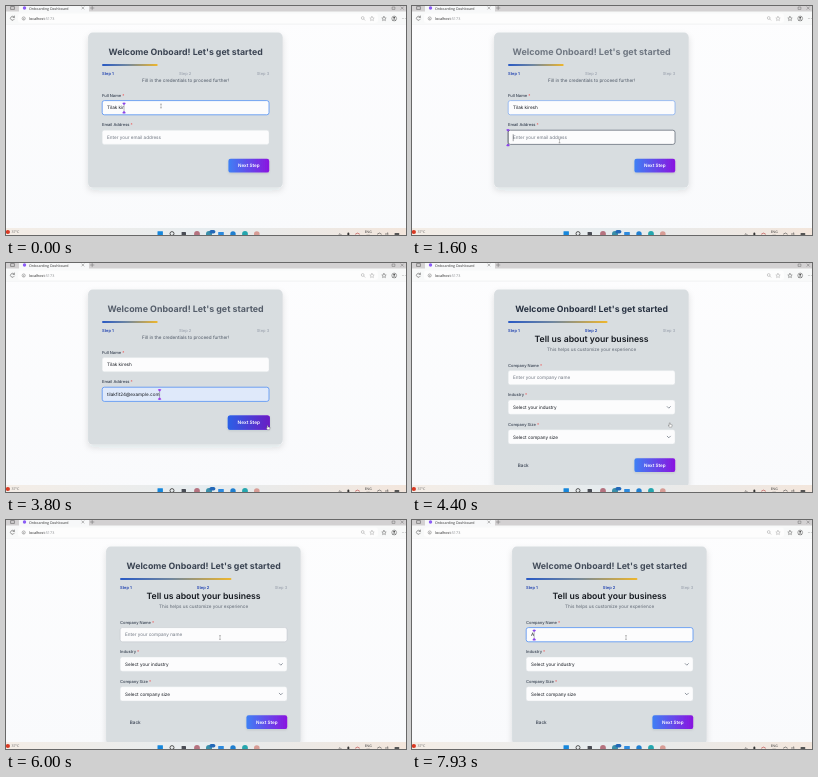
Write an HTML page that moves like this. It is 400 px wide and 229 px high and loops after 8 s.

```html
<!DOCTYPE html>
<html lang="en">
<head>
<meta charset="utf-8">
<title>Onboarding Dashboard</title>
<style>
  html, body { margin: 0; width: 100%; height: 100%; overflow: hidden; background: #fbfbfd; }
  svg { display: block; width: 100vw; height: 100vh; }
  text { font-family: Inter, sans-serif; text-rendering: geometricPrecision; white-space: pre; }
  .ui { font-family: "Open Sans", "Noto Sans", sans-serif; }
</style>
</head>
<body>
<svg viewBox="0 0 400 229">
  <defs>
    <linearGradient id="page" x2="0" y2="1">
      <stop stop-color="#fdfdfe"/><stop offset="1" stop-color="#f9fafc"/>
    </linearGradient>
    <linearGradient id="bar">
      <stop stop-color="#2859c5"/><stop offset=".45" stop-color="#6f86a0"/><stop offset="1" stop-color="#efb62c"/>
    </linearGradient>
    <linearGradient id="btn">
      <stop stop-color="#3f80f4"/><stop offset="1" stop-color="#8a14e0"/>
    </linearGradient>
    <linearGradient id="btnHover">
      <stop stop-color="#2b60e6"/><stop offset="1" stop-color="#6a1cc4"/>
    </linearGradient>
    <linearGradient id="task">
      <stop stop-color="#f4ede6"/><stop offset=".5" stop-color="#e6ecef"/><stop offset="1" stop-color="#f3e6dc"/>
    </linearGradient>
    <filter id="soft" x="-20%" y="-20%" width="140%" height="150%">
      <feDropShadow dx="0" dy="3" stdDeviation="3" flood-color="#1f2937" flood-opacity=".12"/>
    </filter>
    <filter id="lift" x="-20%" y="-40%" width="140%" height="220%">
      <feDropShadow dx="0" dy=".9" stdDeviation=".8" flood-color="#1f2937" flood-opacity=".12"/>
    </filter>
  </defs>
  <rect width="400" height="229" fill="url(#page)"/>
  <g id="card"></g>
  <g id="chrome"></g>
  <g id="popups"></g>
  <g id="mouse"></g>
</svg>
<script>
const LOOP = 8000;
const NAME = 'Tilak kiresh', MAIL = 'tilakfit24@example.com';
const INK = '#14181f', LABEL = '#374151', HINT = '#6f7681', BLUE = '#4a8bf5', EDGE = '#dfe2e6';
const BODY = 4.62, SMALL = 4.05, BIG = 8.66;
const LEFT = 96, WIDE = 167.2, MID = LEFT + WIDE / 2;
const NEXT_AT = 4050, FOCUS_MAIL = 1540, PICK_MAIL = 3000, FOCUS_COMPANY = 6750;

const $ = id => document.getElementById(id);
const clamp = v => Math.min(1, Math.max(0, v));
const span = (t, a, b) => clamp((t - a) / (b - a));
const ease = k => k * k * (3 - 2 * k);
const mix = (a, b, k) => a + (b - a) * k;
const blend = (a, b, k) => {
  const part = (h, i) => parseInt(h.slice(i, i + 2), 16);
  return `rgb(${[1, 3, 5].map(i => Math.round(mix(part(a, i), part(b, i), k)))})`;
};

const pen = document.createElement('canvas').getContext('2d');
function textWidth(s, size = BODY) {
  pen.font = '100px Inter, sans-serif';
  return pen.measureText(s).width * size / 100;
}

const rect = (x, y, w, h, fill, r = 0, more = '') =>
  `<rect x="${x}" y="${y}" width="${w}" height="${h}" rx="${r}" fill="${fill}" ${more}/>`;
const dot = (x, y, r, fill) => `<circle cx="${x}" cy="${y}" r="${r}" fill="${fill}"/>`;
const line = (d, stroke = '#555', w = .6) =>
  `<path d="${d}" fill="none" stroke="${stroke}" stroke-width="${w}" stroke-linecap="round" stroke-linejoin="round"/>`;
const text = (x, y, s, size, fill, weight = 400, anchor = 'start', more = '') =>
  `<text x="${x}" y="${y}" font-size="${size}" fill="${fill}" font-weight="${weight}" text-anchor="${anchor}" ${more}>${s}</text>`;
const group = (s, attrs) => `<g ${attrs}>${s}</g>`;

const label = (y, s) =>
  text(LEFT, y, `${s} <tspan fill="#ef4444">*</tspan>`, SMALL, LABEL, 500);

function field(y, value, hint, edge = EDGE, focus = 0, fill = '#fcfcfd') {
  return rect(LEFT + .2, y + .2, WIDE - .4, 14.2, fill, 2.2,
      `stroke="${edge}" stroke-width="${mix(.4, .75, focus)}"`) +
    text(101, y + 9, value || hint, BODY, value ? INK : HINT);
}

const select = (y, s) => field(y, s, '') +
  line(`M255.2 ${y + 6.7}l1.6 1.6 1.6-1.6`, '#4b5563', .6);

function nextButton(y, hover) {
  const x = 222.4, w = LEFT + WIDE - x, cx = x + w / 2;
  const box = rect(x, y, w, 13.8, 'url(#btn)', 2.2, 'filter="url(#lift)"') +
    rect(x, y, w, 13.8, 'url(#btnHover)', 2.2, `opacity="${hover}"`) +
    text(cx, y + 8.6, 'Next Step', BODY, '#fff', 600, 'middle');
  const k = 1 + .03 * hover;
  return group(box, `transform="translate(${cx} ${y + 7}) scale(${k}) translate(${-cx} ${-y - 7})"`);
}

// Coloured handles above and below the text caret
function caretMark(x, top, bottom, tint = '#8b45e8') {
  const drop = (y, d) =>
    `<path d="M${x - 1.8} ${y - d * .7}q1.8 ${-d * 1.3} 3.6 0l-1.2 ${d * 1.6}h-1.2z" fill="${tint}"/>`;
  return line(`M${x} ${top + 1}V${bottom - 1}`, INK, .3) + drop(top, 1) + drop(bottom, -1);
}

const typed = t => ({
  name: NAME.slice(0, 9 + Math.min(3, Math.floor(t / 230))),
  mail: t >= PICK_MAIL ? MAIL : MAIL.slice(0, Math.max(0, Math.min(3, Math.floor((t - 1800) / 200)))),
  company: t >= 7700 ? 'A' : ''
});

function stepOne(t) {
  const { name, mail } = typed(t);
  const swap = span(t, FOCUS_MAIL, FOCUS_MAIL + 220);
  const picked = t >= PICK_MAIL;
  const nameEdge = blend(BLUE, EDGE, swap);
  const mailEdge = swap < 1 ? blend(EDGE, '#374151', clamp(swap * 3)) : BLUE;
  let s = text(MID, 75.6, 'Fill in the credentials to proceed further!', BODY, '#4b5563', 400, 'middle') +
    label(90.7, 'Full Name') + field(94.4, name, '', nameEdge, 1 - swap) +
    label(120.3, 'Email Address') +
    field(124, mail, 'Enter your email address', mailEdge, clamp(swap * 3), picked ? '#dfe9fa' : undefined) +
    nextButton(152.8, ease(span(t, 3500, 3700)));
  if (t < FOCUS_MAIL) s += caretMark(101 + textWidth(name), 97.8, 106.2);
  else if (!mail) s += line('M101.2 128.6v6.2', INK, .4) + caretMark(LEFT, 124.4, 139);
  else s += caretMark(101 + textWidth(mail), 127.3, 135.6, picked ? '#9f3fea' : '#d42fb0');
  return s;
}

function stepTwo(t) {
  const { company } = typed(t);
  const focus = ease(span(t, FOCUS_COMPANY, FOCUS_COMPANY + 250));
  const hover = span(t, 4800, 5000);
  let s = text(MID, 79, 'Tell us about your business', BIG, INK, 600, 'middle') +
    text(MID, 88.1, 'This helps us customize your experience', BODY, '#5f6773', 400, 'middle') +
    label(103.7, 'Company Name') +
    field(107.4, company, 'Enter your company name',
      focus ? blend('#b4b9c1', BLUE, focus) : blend(EDGE, '#b4b9c1', hover), focus) +
    label(133.2, 'Industry') + select(136.9, 'Select your industry') +
    label(162.8, 'Company Size') + select(166.5, 'Select company size') +
    text(111.2, 203.8, 'Back', BODY, LABEL, 500, 'middle') + nextButton(195.3, 0);
  if (company) s += caretMark(101 + textWidth(company), 110.9, 119.2);
  else if (t >= FOCUS_COMPANY) s += line('M101.2 112v6.2', INK, .4) + caretMark(LEFT, 108, 122.4);
  return group(s, `opacity="${ease(span(t, NEXT_AT, NEXT_AT + 300))}"`);
}

function drawCard(t) {
  const second = t >= NEXT_AT;
  const dx = 18 * ease(span(t, 5400, 5700));
  const pulse = (1 + Math.cos((t - 1320) / 1000 * Math.PI)) / 2;
  const bar = WIDE / 3 * (1 + ease(span(t, NEXT_AT, NEXT_AT + 500)));
  const title = text(0, 3.2, "Welcome Onboard! Let's get started", BIG, '#263040', 700, 'middle');
  const on = '#1e40af', off = '#9ca3af';
  return group(
    rect(82.1, 26.6, 194.6, second ? 198 : 155, '#d8dde0', 4.6, 'filter="url(#soft)"') +
    group(title, `transform="translate(${MID} 45.5) scale(${1 + .045 * pulse})" opacity="${1 - .5 * pulse}"`) +
    rect(LEFT, 57.9, bar, 2.2, 'url(#bar)', 1.1) +
    text(LEFT, 69.2, 'Step 1', SMALL, on, 600) +
    text(179.1, 69.2, 'Step 2', SMALL, second ? on : off, second ? 600 : 500, 'middle') +
    text(LEFT + WIDE, 69.2, 'Step 3', SMALL, off, 500, 'end') +
    (second ? stepTwo(t) : stepOne(t)),
    `transform="translate(${dx} 0)"`);
}

function drawPopups(t) {
  const ui = 'class="ui"';
  let s = '';
  if (t >= 2000 && t < PICK_MAIL) {
    s += rect(108.5, 140, 86.8, 20.3, '#dddcda', 1) +
      rect(109.5, 149.2, 85, 10, '#d3d2d1', .8, `opacity="${span(t, 2750, 2850)}"`) +
      line('M112.6 137.2l1.2-.8 1.2.8', '#aaa', .4) +
      text(111.3, 146.2, 'Saved info', 3.2, '#777', 400, 'start', ui) +
      text(111.3, 155.4, MAIL, 4.2, '#333', 400, 'start', ui);
  }
  if (t >= 2250 && t < 2800) {
    s += rect(149.3, 139.3, 99.3, 6.6, '#fdfdfd', 0, 'stroke="#777" stroke-width=".4"') +
      text(152, 143.7, `Please include an '@' in the email address. '${typed(t).mail}' is missing an '@'.`,
        2.95, '#444', 400, 'start', ui);
  }
  return s;
}

function drawChrome() {
  const ui = 'class="ui"';
  let s = rect(0, 0, 400, 6, '#d3d1d2') + rect(13, -2, 70, 9, '#f7f8f9', 1.5) +
    rect(0, 5.5, 400, 13, '#f8f9f9') + rect(12, 7.4, 360, 9.6, '#fdfdfd', 3) +
    rect(0, 18.3, 400, .3, '#eaecee');
  s += line('M5 .6h3.4v2.8H5z', '#444', .5) + dot(18.5, 2, 1.7, '#8b5cf6') +
    text(23, 3.5, 'Onboarding Dashboard', 3.6, '#333', 400, 'start', ui) +
    line('M75.8.9l2.2 2.2M78 .9l-2.2 2.2M84.5 2h3.4M86.2.3v3.4', '#555', .4) +
    line('M386.5 1h2.4v2.4h-2.4zM395 .9l2.4 2.4M397.4.9L395 3.3', '#555', .4);
  s += line('M8.2 11.2a2 2 0 1 0 .1 2M8.4 10v1.4H7', '#444', .5) +
    `<circle cx="17.7" cy="12.5" r="1.6" fill="none" stroke="#555" stroke-width=".4"/>` +
    line('M17.7 12.3v1', '#555', .45) +
    text(23, 13.8, 'localhost<tspan fill="#85888c">:5173</tspan>', 3.75, '#222', 400, 'start', ui);
  s += `<circle cx="356.7" cy="12" r="1.4" fill="none" stroke="#888" stroke-width=".4"/>` +
    line('M357.8 13.1l1.1 1.1', '#888', .4) +
    line('M366 10.4l.7 1.4 1.5.2-1.1 1 .3 1.6-1.4-.8-1.4.8.3-1.6-1.1-1 1.5-.2z', '#888', .35) +
    line('M378 10.4l.7 1.4 1.5.2-1.1 1 .3 1.6-1.4-.8-1.4.8.3-1.6-1.1-1 1.5-.2z', '#555', .45) +
    `<circle cx="388.2" cy="12.5" r="2.4" fill="none" stroke="#555" stroke-width=".5"/>` +
    dot(388.2, 11.8, 1, '#555') + line('M386.7 14.2q1.5-1.6 3 0', '#555', .6) +
    [396.3, 397.8, 399.3].map(x => dot(x, 12.5, .35, '#555')).join('');

  s += rect(0, 222, 400, 7, 'url(#task)') +
    dot(1.9, 226, 2.1, '#d83a24') + text(5.4, 227.4, '37°C', 3.6, '#666', 400, 'start', ui);
  s += rect(151.5, 225.2, 5.4, 5, '#1687dc', .4) +
    `<circle cx="166" cy="227.6" r="2" fill="none" stroke="#333" stroke-width=".8"/>` +
    line('M167.5 229l1 1', '#333', .8) +
    rect(175.6, 226, 4.4, 4, '#4a4d55', .6) + dot(191, 228, 2.9, '#b5727f') +
    dot(203, 228, 3, '#3a8fa8') + rect(203.4, 224, 6, 3.6, '#2368b8', 1.8) +
    rect(212.2, 226, 5.6, 4, '#2c8ade', .5) + dot(227, 228, 2.7, '#1f7fd0') +
    dot(239, 228, 2.9, '#25a6ae') + dot(250.8, 228, 2.8, '#d79c95');
  s += line('M332.6 229l1.4-1.4 1.4 1.4', '#444', .6) +
    rect(341.4, 226.6, 1.9, 3, '#333', .9) + line('M349.5 228q2-2 4 0', '#b44', .7) +
    text(362.2, 226.7, 'ENG', 3.4, '#333', 400, 'middle', ui) +
    text(362.2, 230.6, 'IN', 3.4, '#333', 400, 'middle', ui) +
    line('M371.4 228q2-2.2 4 0', '#444', .6) +
    line('M379.4 228h1l1.4-1.2v3', '#444', .6) + rect(388.6, 227, 4.6, 2.4, '#555', .5);
  return s;
}

// [time, x, y]: the pointer glides between these stops
const STOPS = [[950, 155, 100], [1450, 147.5, 135], [2650, 147.5, 135], [2920, 150, 154.5],
  [3080, 150, 154.5], [3600, 261.8, 164.5], [4300, 261.8, 164.5], [4950, 202, 125],
  [5500, 202, 125], [5950, 214, 117.5]];

function drawMouse(t) {
  const i = STOPS.findIndex(p => p[0] > t);
  const b = i < 0 ? STOPS[STOPS.length - 1] : STOPS[i], a = i > 0 ? STOPS[i - 1] : b;
  const k = a === b ? 0 : ease(span(t, a[0], b[0]));
  const x = mix(a[1], b[1], k), y = mix(a[2], b[2], k);
  const at = `transform="translate(${x} ${y})"`;
  if (t > 3450 && t < 4500)
    return group(`<path d="M-.6-2v2.6l-1-.5.9 2.1h2.5l.5-2.3-2-.5V-2z" fill="#fff" stroke="#333" stroke-width=".3"/>`, at);
  if ((t > 2700 && t < 3450) || (t >= 4500 && t < 5500))
    return group(`<path d="M-.9-1.7v3.8l.9-.8.6 1.3.6-.3-.6-1.3h1.2z" fill="#fff" stroke="#222" stroke-width=".35"/>`, at);
  return group(line('M-.6-1.8h1.2M0-1.8v3.6M-.6 1.8H.6', '#555', .32), at);
}

function draw(t) {
  $('card').innerHTML = drawCard(t);
  $('popups').innerHTML = drawPopups(t);
  $('mouse').innerHTML = drawMouse(t);
}

$('chrome').innerHTML = drawChrome();
const start = performance.now();
function tick() {
  draw((performance.now() - start) % LOOP);
  requestAnimationFrame(tick);
}
tick();
</script>
</body>
</html>
```
